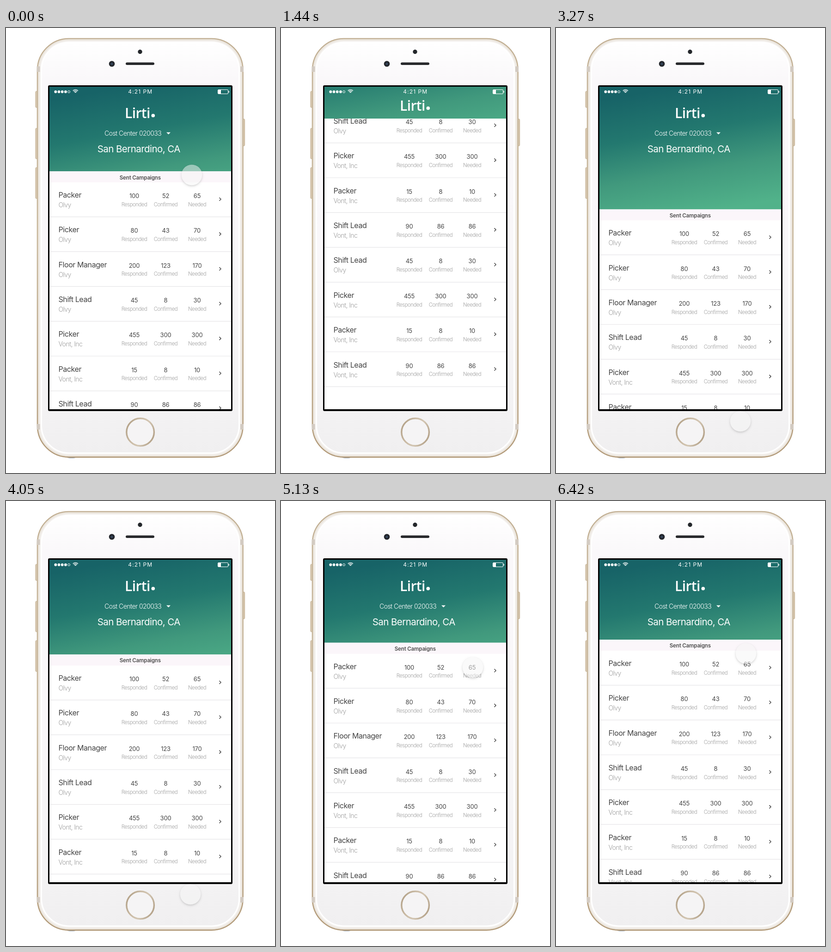
These frames come from a looping animation (582 px wide and 963 px high, 6450 ms). An HTML page with a canvas:

```html
<!DOCTYPE html>
<html lang="en">
<head>
<meta charset="utf-8">
<title>Campaign list</title>
<style>
html, body { margin: 0; width: 100%; height: 100%; overflow: hidden; background: #fff; }
canvas { display: block; }
</style>
</head>
<body>
<canvas id="stage" width="582" height="963"></canvas>
<script>
const ctx = document.getElementById('stage').getContext('2d');
const LOOP = 6450, STEP = 30, PITCH = 75.35;
const HEAD = 310, HEAD_MIN = 196;
const COLS = [[277.5, 'Responded'], [345.5, 'Confirmed'], [413.5, 'Needed']];

const A = 'Olvy', B = 'Vont, Inc';
const repeated = [
  ['Shift Lead', A, 45, 8, 30],
  ['Picker', B, 455, 300, 300],
  ['Packer', B, 15, 8, 10],
  ['Shift Lead', B, 90, 86, 86]
];
const rows = [
  ['Packer', A, 100, 52, 65],
  ['Picker', A, 80, 43, 70],
  ['Floor Manager', A, 200, 123, 170],
  ...repeated, ...repeated
];

const clamp = (v, a = 0, b = 1) => Math.min(b, Math.max(a, v));

// Smooth monotone curve through [time, value] points.
function curve(pts) {
  const slope = i => (pts[i + 1][1] - pts[i][1]) / (pts[i + 1][0] - pts[i][0]);
  const tangent = i => {
    if (i === 0 || i === pts.length - 1) return 0;
    const a = slope(i - 1), b = slope(i);
    return a * b <= 0 ? 0 : 2 * a * b / (a + b);
  };
  return t => {
    if (t <= pts[0][0]) return pts[0][1];
    for (let i = 0; i < pts.length - 1; i++) {
      const [t0, v0] = pts[i], [t1, v1] = pts[i + 1];
      if (t > t1) continue;
      const h = t1 - t0, u = (t - t0) / h, w = 1 - u;
      return v0 * (1 + 2 * u) * w * w + v1 * u * u * (3 - 2 * u) +
        h * u * w * (tangent(i) * w - tangent(i + 1) * u);
    }
    return pts[pts.length - 1][1];
  };
}

const fingerX = curve([[0, 402], [1400, 400], [2400, 400], [3240, 399], [4150, 399], [5000, 415], [5500, 415], [6420, 411]]);
const fingerY = curve([[0, 318], [300, 304], [1000, 70], [1350, 30], [1430, -50], [1800, -50],
  [2280, 264], [2400, 267], [3240, 851], [4150, 851], [5000, 360], [5500, 360], [6420, 330]]);
const flick = curve([[0, 0], [300, -16], [1150, -385], [1280, -390], [1440, -386], [1980, -370], [2400, -355.5]]);

// List offset: flick up, drag down with resistance past the top, then settle.
function scrollAt(t) {
  if (t < 2400) return flick(t);
  if (t < 3270) {
    const d = fingerY(t) - 267;
    return -355.5 + Math.min(d, 344) + Math.max(0, d - 344) * 0.39;
  }
  return -11.5 + 93.7 * Math.exp((3270 - t) / 757);
}

function text(str, x, y, size, weight, color, spacing = 0, align = 'left', family = 'Inter') {
  ctx.font = `${weight} ${size}px ${family}, sans-serif`;
  ctx.letterSpacing = spacing + 'px';
  ctx.textAlign = align;
  ctx.fillStyle = color;
  ctx.fillText(str, x, y);
}

function box(x, y, w, h, r, fill, stroke, width = 1) {
  ctx.beginPath();
  ctx.roundRect(x, y, w, h, r);
  if (fill) { ctx.fillStyle = fill; ctx.fill(); }
  if (stroke) { ctx.strokeStyle = stroke; ctx.lineWidth = width; ctx.stroke(); }
}

function disc(x, y, r, fill) {
  ctx.beginPath();
  ctx.arc(x, y, r, 0, 7);
  ctx.fillStyle = fill;
  ctx.fill();
}

function line(pts, color, width) {
  ctx.beginPath();
  pts.forEach(p => ctx.lineTo(...p));
  ctx.strokeStyle = color;
  ctx.lineWidth = width;
  ctx.stroke();
}

function gradient(x0, y0, x1, y1, ...stops) {
  const g = ctx.createLinearGradient(x0, y0, x1, y1);
  stops.forEach(([at, c]) => g.addColorStop(at, c));
  return g;
}

function drawPhone() {
  [[137, 35], [217, 66], [302, 67]].forEach(([y, h]) => box(64, y, 4, h, 1.5, '#dccdb6', '#bda888'));
  box(512.5, 197, 4, 58, 1.5, '#dccdb6', '#bda888');

  ctx.beginPath();
  ctx.ellipse(142, 929, 10, 2, 0, 0, 7);
  ctx.fillStyle = '#8d9aab';
  ctx.fill();

  box(68, 23, 444.6, 905.6, 68, '#f3f0ed', gradient(0, 22, 0, 929, [0, '#c2b094'], [0.5, '#c6b598'], [1, '#b39b7a']), 2.6);
  box(71, 26, 438.6, 899.6, 65, null, '#ebe5dc', 2);
  box(76.5, 31, 428, 889, 60,
    gradient(0, 31, 0, 920, [0, '#ffffff'], [0.09, '#faf8fa'], [0.5, '#f9f7f9'], [0.9, '#f3f2f3'], [1, '#f0eff0']), '#fff', 3);
  for (const y of [83, 857]) {
    box(66.5, y, 7, 12, 0, '#d3cbc2');
    box(507, y, 7, 12, 0, '#d3cbc2');
  }

  disc(290, 51.5, 4.7, '#24272b');
  disc(229, 77.5, 6.3, '#22252b');
  disc(229, 77.5, 2.6, '#35455a');
  box(259, 74.5, 62, 5.5, 2.75, '#28292c');

  ctx.beginPath();
  ctx.arc(290.6, 874.5, 29.8, 0, 7);
  ctx.fillStyle = '#f5f4f5';
  ctx.fill();
  ctx.strokeStyle = gradient(262, 862, 320, 888, [0, '#b5a48b'], [0.35, '#cbbca6'], [0.6, '#d3c6b3'], [1, '#b3a188']);
  ctx.lineWidth = 3.4;
  ctx.stroke();
}

function drawRow([title, firm, ...nums], y) {
  text(title, 113.5, y + 6, 16, 400, '#434343', -0.42);
  text(firm, 113.5, y + 27, 14, 300, '#9f9f9f', -0.6);
  COLS.forEach(([x, label], i) => {
    text(nums[i], x, y + 7, 13, 400, '#434343', -0.2, 'center');
    text(label, x, y + 24.7, 11.3, 300, '#9f9f9f', -0.45, 'center');
  });
  line([[461.5, y + 6], [465, y + 9.5], [461.5, y + 13]], '#4a4a4a', 1.5);
  box(94, y + 47, 393, 1.2, 0, '#e6e5e8');
}

function drawStatus() {
  for (let i = 0; i < 4; i++) disc(107.3 + i * 7.2, 138, 2.9, '#fff');
  ctx.strokeStyle = '#fff';
  ctx.lineWidth = 1;
  ctx.beginPath();
  ctx.arc(136.1, 138, 2.4, 0, 7);
  ctx.stroke();
  ctx.lineWidth = 1.6;
  for (const r of [2.2, 5, 7.8]) {
    ctx.beginPath();
    ctx.arc(150.3, 141.3, r, -Math.PI * 0.75, -Math.PI * 0.25);
    ctx.stroke();
  }
  text('4:21 PM', 290.8, 142.3, 12, 400, '#fff', 1.1, 'center');
  box(458.5, 133.5, 22, 9, 1.5, null, '#fff');
  box(459, 134, 6, 8, 0, '#fff');
  box(481.5, 136.3, 1.5, 3.5, 0.5, '#fff');
}

function drawHeader(s) {
  const bottom = Math.max(HEAD_MIN, HEAD + s);
  const fold = clamp((-s - 20) / 94);
  const top = 126 - 138 * fold;
  box(94, 126, 393, bottom - 126, 0, gradient(266, top, 314, top + 274,
    [0, '#176367'], [0.35, '#23786f'], [0.67, '#41997d'], [1, '#51b28a']));
  drawStatus();

  const lift = -16 * fold;
  text('Lirti', 257, 194.5 + lift, 30, 600, '#fff', -0.6, 'left', '"Open Sans"');
  disc(318.3, 189.5 + lift, 3.8, '#fff');

  ctx.globalAlpha = 1 - clamp(fold * 1.4);
  text('Cost Center 020033', 213, 232.8, 14, 300, '#fff', -0.55);
  ctx.beginPath();
  ctx.moveTo(347, 225.8);
  ctx.lineTo(356, 225.8);
  ctx.lineTo(351.5, 230.3);
  ctx.fill();
  text('San Bernardino, CA', 287.3, 269.3, 20.5, 400, '#fff', -0.56, 'center');
  ctx.globalAlpha = 1;
}

function drawScreen(s) {
  box(91, 124, 399, 705, 3, '#000');
  ctx.save();
  ctx.beginPath();
  ctx.rect(94, 127, 393, 698);
  ctx.clip();
  box(94, 126, 393, 700, 0, '#fff');
  box(94, HEAD + s, 393, 24, 0, '#fbf6fa');
  text('Sent Campaigns', 290.3, 327.5 + s, 11.5, 600, '#4c4c4c', -0.15, 'center');
  rows.forEach((row, i) => drawRow(row, 361 + s + i * PITCH));
  drawHeader(s);
  ctx.restore();
}

function drawFinger(x, y) {
  const r = 22.3;
  ctx.save();
  ctx.beginPath();
  ctx.rect(x - 50, y - 50, 100, 100);
  ctx.arc(x, y, r, 0, 7);
  ctx.clip('evenodd');
  ctx.shadowColor = 'rgba(0,0,0,.2)';
  ctx.shadowBlur = 5;
  ctx.shadowOffsetY = 2;
  disc(x, y, r - 0.5, '#fff');
  ctx.restore();
  disc(x, y, r, 'rgba(246,246,246,.5)');
}

function draw(t) {
  ctx.fillStyle = '#fff';
  ctx.fillRect(0, 0, 582, 963);
  drawPhone();
  drawScreen(scrollAt(t));
  drawFinger(fingerX(t), fingerY(t));
}

let start;
function tick(now) {
  start ??= now;
  draw(Math.floor((now - start) % LOOP / STEP) * STEP);
  requestAnimationFrame(tick);
}
draw(0);
requestAnimationFrame(tick);
</script>
</body>
</html>
```
